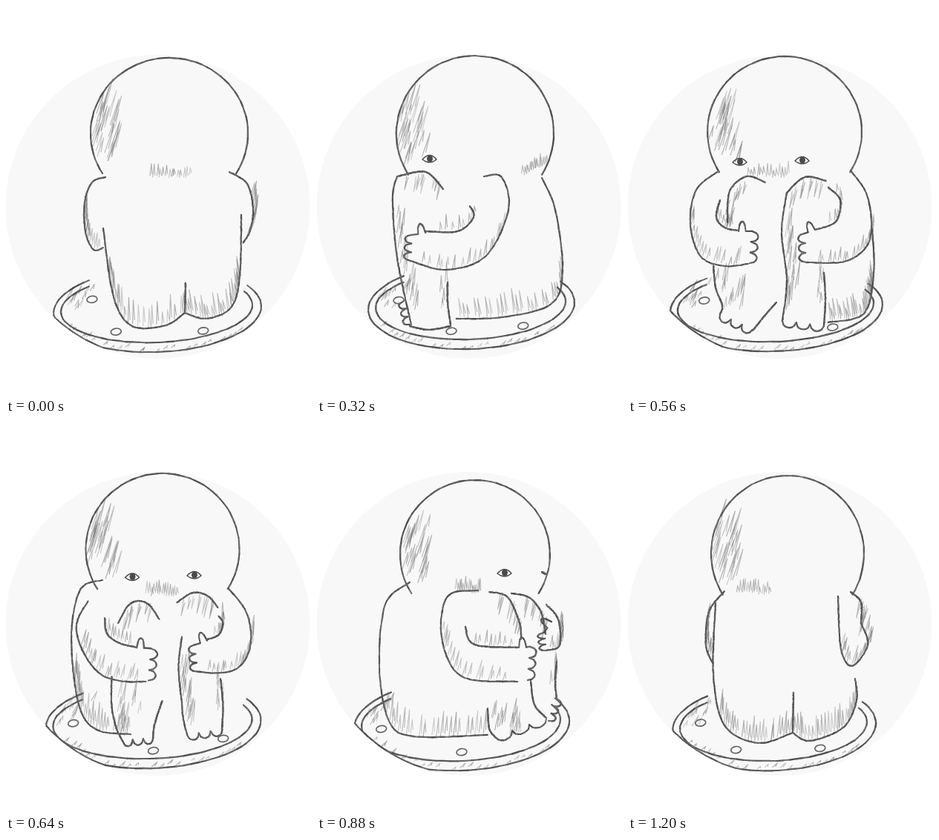
These frames come from a looping animation (411 by 525 pixels, 1.28 s). An HTML page with a canvas:

```html
<!DOCTYPE html>
<html lang="en">
<head>
<meta charset="utf-8">
<title>Turning figure</title>
<style>
html, body { margin: 0; width: 100%; height: 100%; overflow: hidden; background: #fff; }
canvas { display: block; width: 411px; height: 525px; }
</style>
</head>
<body>
<canvas id="stage" width="411" height="525"></canvas>
<script>
const ctx = document.getElementById("stage").getContext("2d");
const STEP = 80, COUNT = 16, POINTS = 60;
const PAPER = { x: 204.5, y: 271, r: 205 };

// head, plate: ellipse. eye: centre. peb: angle on the plate. hand: wrist, knuckle, thumb.
// toes: ends of a row. neck: shaded only. All others: key points of a smooth line.
const back = {
  head: "220 172 106 102", plate: "204 410 140 57", neck: "193 234 250 232",
  armR: "134 231 116 238 106 265 107 305 118 329 131 326",
  armL: "301 224 325 240 333 275 329 303 320 319",
  bott: "241 414 215 431 170 432 145 393 131 300",
  side: "317 282 315 365 303 407 270 422 241 414",
  cleft: "241 414 242 374",
  pebA: "-123", pebB: "-32", pebC: "36"
};
const left = {
  head: "213 172 106 105", plate: "208 405 139 58", neck: "275 231 310 214",
  side: "303 232 321 275 331 355 316 402 250 420 188 422",
  kneeR: "170 247 146 224 108 230", shinR: "108 230 102 260 108 340 127 430",
  armR: "225 230 249 231 258 275 228 337 175 356 126 344",
  handR: "126 344 128 309 146 306", innR: "146 304 190 304 211 285 206 270",
  calfR: "176 373 176 400 180 430", sole: "125 432 150 437 180 432", toesR: "117 398 125 430",
  eyeR: "152 206", pebA: "-15", pebB: "42", pebT: "-110"
};
const front = {
  head: "211 170 104 102", plate: "200 408 143 58", neck: "160 231 218 232",
  armL: "122 223 92 248 84 295 98 338 130 351 162 348",
  handL: "164 347 167 304 149 304", innL: "124 262 119 285 130 299 148 303",
  kneeL: "134 292 137 250 160 230 185 238",
  shinL: "115 350 118 380 127 404 124 416", calfL: "200 400 185 417 168 438", toesL: "124 416 168 437",
  kneeR: "267 236 238 231 214 252", shinR: "214 252 207 305 214 370 208 425",
  armR: "300 222 323 258 326 315 295 344 240 346",
  handR: "240 346 238 307 252 302", innR: "252 302 280 291 286 262 270 245",
  calfR: "264 360 266 395 264 432", toesR: "208 425 264 432",
  side: "329 300 331 360 318 415 270 427",
  eyeL: "151 210", eyeR: "235 208", pebA: "45", pebU: "-115"
};
const turned = {
  head: "211 170 103 102", plate: "197 405 147 61", neck: "215 236 245 236",
  back: "130 212 100 225 88 290 98 380 122 414 168 420",
  armL: "99 258 103 302 150 338 215 350",
  handL: "220 348 224 305 203 302", innL: "142 265 155 288 202 302",
  kneeL: "168 248 198 229 223 245 228 292",
  shinL: "170 335 167 380 172 425 190 442", calfL: "221 350 221 390 228 412", toesL: "190 442 229 412",
  kneeR: "304 262 297 237 273 222 247 232", shinR: "260 325 258 360 262 400 280 417",
  armR: "299 224 330 262 326 315 300 328 275 325",
  handR: "275 325 271 292 290 285", innR: "288 283 303 276",
  calfR: "314 330 319 365 318 395", toesR: "280 417 319 395",
  eyeL: "190 205", eyeR: "273 202", pebU: "-80", pebT: "0", pebA: "75"
};
const right = {
  head: "213 177 101 100", plate: "195 407 145 62", neck: "185 227 220 232",
  back: "125 215 92 245 84 330 97 402 130 423 230 421",
  armL: "217 226 176 234 168 290 195 342 270 349",
  handL: "284 347 287 302 272 303", innL: "200 275 212 299 272 303",
  kneeL: "232 228 257 235 273 270 275 292",
  shinL: "230 385 232 412 240 424", calfL: "288 348 293 380 309 398", toesL: "240 424 309 399",
  kneeR: "308 285 302 255 285 235 262 230",
  armR: "309 245 325 265 327 300 309 307", handR: "309 307 306 283 316 268",
  calfR: "323 322 321 350 323 372", toesR: "312 402 323 372",
  eyeL: "253 202", tick: "303 201 308 204", pebU: "0", pebV: "-85"
};
const away = {
  head: "208 176 99 104", plate: "187 410 142 60", neck: "134 232 180 233",
  back: "118 220 90 260 86 335 98 398 135 428",
  bott: "143 413 160 433 215 440 265 425 285 385 283 344",
  armL: "214 230 211 285 230 338 275 346 317 325 320 300 314 277",
  innL: "265 235 273 265 313 279", kneeR: "316 277 308 243 290 226",
  calfR: "302 340 306 380 306 403", sole: "306 408 287 406", toesR: "306 405 304 372",
  tick: "301 201 306 204", pebU: "30", pebV: "-8", pebW: "-95"
};
const nearly = {
  head: "215 176 103 105", plate: "197 410 137 59", neck: "145 231 193 232",
  armR: "130 227 109 255 105 300 114 324",
  back: "118 243 115 340 130 408 175 432 222 418",
  bott: "222 418 245 429 290 411 308 375 306 345",
  cleft: "222 418 223 364",
  armL: "283 234 287 305 302 328 323 300 314 270", kneeR: "314 270 314 242 300 228",
  pebV: "37", pebW: "-30", pebX: "-105"
};

// Strokes per part: from, to (share of its line), dx, dy, count, sideways spread.
const SHADE = {
  head: [0.03, 0.2, 13, -38, 24, 30], neck: [0, 1, 2, -17, 14, 0],
  back: [0.55, 1, 4, -32, 24, 0], side: [0.45, 1, -3, -30, 24, 0], bott: [0, 0.75, 1, -32, 24, 0],
  armL: [0.4, 0.95, 7, -22, 16, 0], armR: [0.4, 0.95, 4, -20, 16, 0],
  innL: [0.3, 0.9, 3, -17, 8, 0], innR: [0.2, 0.9, 1, -19, 8, 0],
  kneeL: [0.1, 0.7, -5, 28, 8, 8], kneeR: [0.2, 0.9, -4, 26, 8, 8],
  shinL: [0.3, 1, 7, -30, 14, 36], shinR: [0.3, 0.95, 6, -34, 16, 12],
  calfR: [0, 0.7, 2, -24, 6, -12],
  inner: [0.04, 0.2, 9, -14, 10, 25], outer: [0.3, 0.75, 7, -6, 22, 0]
};

const nums = s => s.match(/-?\d+/g).map(Number);
const isRaw = name => /^(head|plate|peb|eye|hand|toes)/.test(name);

// Catmull-Rom through the points, then even spacing along its length.
function smooth(v) {
  const n = v.length / 2, dense = [], out = [];
  const at = (i, k) => v[Math.min(n - 1, Math.max(0, i)) * 2 + k];
  const cubic = (i, k, t) => {
    const a = at(i - 1, k), b = at(i, k), c = at(i + 1, k), d = at(i + 2, k);
    return b + t * (c - a + t * (2 * a - 5 * b + 4 * c - d + t * (3 * (b - c) + d - a))) / 2;
  };
  let len = 0;
  for (let i = 0; i < n - 1; i++) for (let j = 0; j <= 10; j++) {
    const x = cubic(i, 0, j / 10), y = cubic(i, 1, j / 10), p = dense[dense.length - 1];
    if (p) len += Math.hypot(x - p[0], y - p[1]);
    dense.push([x, y, len]);
  }
  for (let i = 0, k = 0; i <= POINTS; i++) {
    const want = len * i / POINTS;
    while (k < dense.length - 2 && dense[k + 1][2] < want) k++;
    const [x, y, l] = dense[k], [p, q, m] = dense[k + 1], t = m > l ? (want - l) / (m - l) : 0;
    out.push(x + (p - x) * t, y + (q - y) * t);
  }
  return out;
}

function build(pose) {
  const out = {};
  for (const name in pose) {
    const v = nums(pose[name]);
    out[name] = isRaw(name) ? v : smooth(v);
  }
  return out;
}

// The view between the back and the left side is the "away" view flipped.
function flip(pose) {
  const out = {}, swap = { L: "R", R: "L" };
  for (const name in pose) {
    if (/^(peb|plate|neck)/.test(name)) continue;
    let v = nums(pose[name]);
    const end = name === "head" ? 1 : v.length;
    for (let i = 0; i < end; i += 2) v[i] = 424 - v[i];
    if (name.startsWith("toes")) v = [v[2], v[3], v[0], v[1]];
    const to = name === "back" ? "side" : name.replace(/[LR]$/, c => swap[c]);
    out[to] = v.join(" ");
  }
  return out;
}

const half = { ...flip(away), plate: back.plate, neck: back.neck, pebA: "-70", pebB: "5", pebC: "75" };
const keys = [[0, back], [2, half], [4, left], [7, front], [9, turned], [11, right], [13, away], [15, nearly]]
  .map(([step, pose]) => [step, build(pose)]);

function poseAt(step) {
  let i = keys.length - 1;
  while (keys[i][0] > step) i--;
  const [s, a] = keys[i];
  if (s === step) return a;
  const [e, b] = keys[i + 1], w = (step - s) / (e - s), out = {};
  for (const name of Object.keys({ ...a, ...b })) {
    if (a[name] && b[name]) out[name] = a[name].map((x, k) => x + (b[name][k] - x) * w);
    else {
      const only = (w < 0.5 ? a : b)[name];
      if (only) out[name] = only;
    }
  }
  return out;
}

// Part of an ellipse, kept on the paper disc.
function arc(x, y, rx, ry, from, to, slope = 0) {
  const out = [];
  for (let i = 0; i <= POINTS; i++) {
    const a = (from + (to - from) * i / POINTS) * Math.PI / 180;
    const dx = rx * Math.cos(a), px = x + dx - PAPER.x, py = y + ry * Math.sin(a) - dx * slope - PAPER.y;
    const k = Math.min(1, (PAPER.r - 1) / Math.hypot(px, py));
    out.push(PAPER.x + px * k, PAPER.y + py * k);
  }
  return out;
}

// A row of n round bumps from one point to another.
function bumps(x, y, x2, y2, n, height) {
  const out = [], dx = x2 - x, dy = y2 - y, len = Math.hypot(dx, dy);
  for (let i = 0; i <= n * 8; i++) {
    const t = i / (n * 8), h = height * Math.sqrt(Math.abs(Math.sin(Math.PI * n * t))) / len;
    out.push(x + dx * t - dy * h, y + dy * t + dx * h);
  }
  return out;
}

function hand([ax, ay, bx, by, cx, cy]) {
  const ux = cx - bx, uy = cy - by, len = Math.hypot(ux, uy);
  const side = (bx - ax) * uy - (by - ay) * ux < 0 ? 1 : -1;
  const k = Math.min(1, 10 / len), tx = cx - ux * k, ty = cy - uy * k;
  return [...bumps(ax, ay, bx, by, 3, 9 * side), ...bumps(tx, ty, cx, cy, 1, 13 * side)];
}

function curves(pose) {
  const out = {};
  for (const name in pose) {
    const v = pose[name];
    if (name === "head") out.head = arc(...v, 148, 392);
    else if (name === "plate") {
      const [x, y, rx, ry] = v;
      out.outer = arc(x, y, rx, ry, 229, -30, 0.035);
      out.inner = arc(x - 1, y - 2, rx - 11, ry - 11, 225, -24, 0.035);
    }
    else if (name.startsWith("hand")) out[name] = hand(v);
    else if (name.startsWith("toes")) out[name] = bumps(...v, 3, 8);
    else if (!isRaw(name)) out[name] = v;
  }
  return out;
}

function random(seed) {
  let s = seed * 7919 + 17;
  return () => (s = (s * 16807) % 2147483647) / 2147483647;
}

function pencil(v, rnd) {
  let x = v[0], y = v[1];
  for (let i = 2; i < v.length; i += 2) {
    const nx = v[i] + (rnd() - 0.5) * 0.5, ny = v[i + 1] + (rnd() - 0.5) * 0.5;
    const g = 75 + rnd() * 35;
    ctx.strokeStyle = `rgb(${g},${g},${g})`;
    ctx.lineWidth = 1.9 + rnd() * 0.6;
    ctx.beginPath();
    ctx.moveTo(x, y);
    ctx.lineTo(nx, ny);
    ctx.stroke();
    x = nx; y = ny;
  }
}

function shade(v, [from, to, dx, dy, count, spread], rnd) {
  ctx.lineWidth = 1.1;
  for (let i = 0; i < count; i++) {
    const u = from + (to - from) * (i + rnd() * 0.6) / count;
    const k = 2 * Math.round(Math.min(1, u) * (v.length / 2 - 1)), l = 0.5 + rnd() * 0.6;
    const x = v[k] + rnd() * spread, y = v[k + 1] + Math.sign(dy) * rnd() * 5;
    ctx.strokeStyle = `rgba(105,105,105,${0.3 + rnd() * 0.25})`;
    ctx.beginPath();
    ctx.moveTo(x, y);
    ctx.lineTo(x + dx * l, y + dy * l);
    ctx.lineTo(x + dx * 0.2 + 2.5, y + dy * 0.15);
    ctx.stroke();
  }
}

function eye([x, y]) {
  ctx.strokeStyle = ctx.fillStyle = "#4a4a4a";
  ctx.lineWidth = 1.5;
  ctx.beginPath();
  ctx.moveTo(x - 10, y + 1);
  ctx.quadraticCurveTo(x, y - 10, x + 9, y + 1);
  ctx.quadraticCurveTo(x, y + 9, x - 10, y + 1);
  ctx.stroke();
  ctx.beginPath();
  ctx.ellipse(x, y, 4, 4.5, 0, 0, 7);
  ctx.fill();
}

function pebble([angle], [x, y, rx, ry]) {
  const a = angle * Math.PI / 180;
  ctx.strokeStyle = "#666";
  ctx.lineWidth = 1.7;
  ctx.beginPath();
  ctx.ellipse(x + rx * 0.75 * Math.sin(a), y + 3 + ry * 0.55 * Math.cos(a), 7, 4.5, -0.15, 0, 7);
  ctx.stroke();
}

function draw(step) {
  const rnd = random(step + 1), pose = poseAt(step), lines = curves(pose);
  ctx.fillStyle = "#fff";
  ctx.fillRect(0, 0, 411, 525);
  ctx.save();
  ctx.beginPath();
  ctx.arc(PAPER.x, PAPER.y, PAPER.r, 0, 7);
  ctx.fillStyle = "#f8f8f8";
  ctx.fill();
  ctx.clip();
  ctx.lineCap = ctx.lineJoin = "round";
  for (const name in lines) if (SHADE[name]) shade(lines[name], SHADE[name], rnd);
  for (const name in lines) if (name !== "neck") pencil(lines[name], rnd);
  for (const name in pose) {
    if (name.startsWith("eye")) eye(pose[name]);
    if (name.startsWith("peb")) pebble(pose[name], pose.plate);
  }
  ctx.restore();
}

let shown = -1;
const start = performance.now();
function tick() {
  const step = Math.floor((performance.now() - start) / STEP) % COUNT;
  if (step !== shown) draw(shown = step);
  requestAnimationFrame(tick);
}
tick();
</script>
</body>
</html>
```
